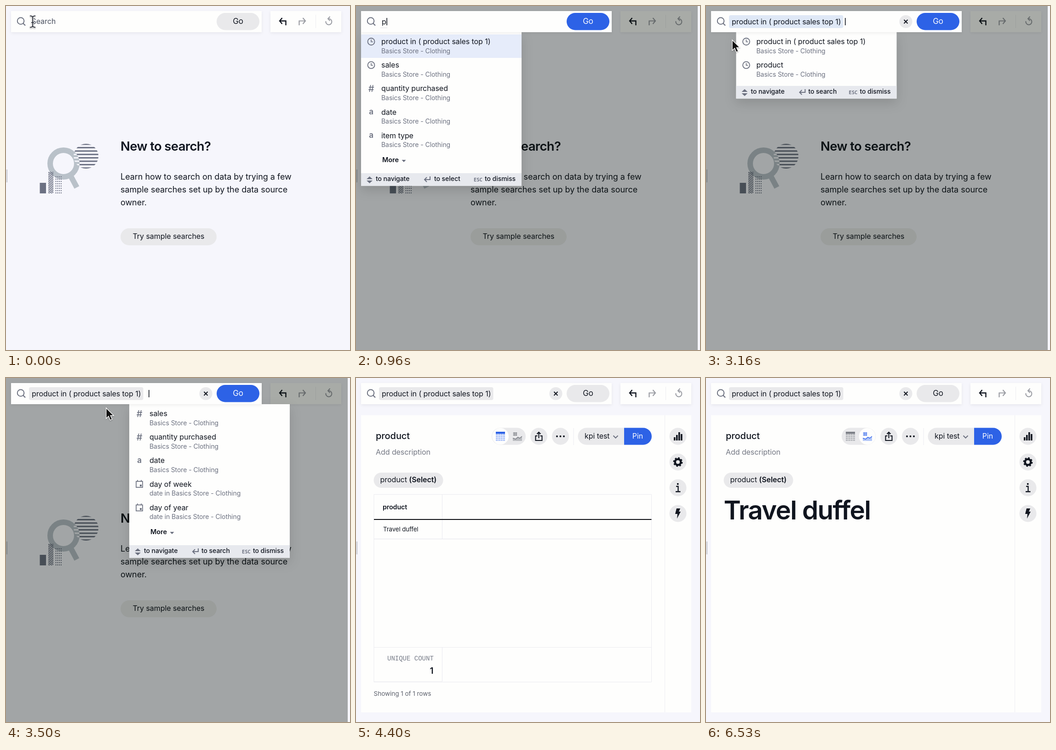
An HTML page for the animation above (8000 ms loop, 748x749 px).

```html
<!DOCTYPE html>
<html lang="en">
<head>
<meta charset="utf-8">
<title>Search demo</title>
<style>
html, body { margin: 0; width: 100%; height: 100%; overflow: hidden; background: #f6f6fc; }
svg { display: block; width: 748px; height: 749px; font-family: Inter, "Open Sans", sans-serif; letter-spacing: -.004em; }
text { white-space: pre; }
.bar { filter: drop-shadow(0 2px 3px #0001); }
.menu { filter: drop-shadow(0 9px 12px #0002); }
.cursor { filter: drop-shadow(0 1px 1px #0005); }
</style>
</head>
<body>
<svg id="stage" viewBox="0 0 748 749"></svg>
<script>
const LOOP = 8000;
const INK = '#10151f', GRAY = '#6c7180', PILL = '#e9e9eb', WHITE = '#fefefd', BLUE = '#2d62e6';
const stage = document.getElementById('stage');
const ctx = document.createElement('canvas').getContext('2d');

// Drawing helpers, all returning SVG markup
const text = (x, y, s, size = 16, fill = INK, more = '') =>
  `<text x="${x}" y="${y}" font-size="${size}" fill="${fill}" ${more}>${s}</text>`;
const rect = (x, y, w, h, fill, rx = 0, more = '') =>
  `<rect x="${x}" y="${y}" width="${w}" height="${h}" fill="${fill}" rx="${rx}" ${more}/>`;
const circle = (x, y, r, fill, more = '') => `<circle cx="${x}" cy="${y}" r="${r}" fill="${fill}" ${more}/>`;
const line = (d, color = INK, w = 2, more = '') =>
  `<path d="${d}" fill="none" stroke="${color}" stroke-width="${w}" ${more}/>`;
const shape = (d, fill, more = '') => `<path d="${d}" fill="${fill}" ${more}/>`;
const at = (x, y, s, cls = '') => `<g transform="translate(${x} ${y})" class="${cls}">${s}</g>`;
const times = (n, f) => Array.from({ length: n }, (_, i) => f(i)).join('');
const bold = 'font-weight="600"', medium = 'font-weight="500"', mid = 'text-anchor="middle"';

const textWidth = s => {
  ctx.font = '16px Inter, "Open Sans", sans-serif';
  return ctx.measureText(s).width;
};
const ease = (t, a, b) => {
  const p = Math.min(1, Math.max(0, (t - a) / (b - a)));
  return p * p * (3 - 2 * p);
};
const mix = (a, b, p) => +(a + (b - a) * p).toFixed(1);

// Search suggestions
const SOURCE = 'Basics Store - Clothing';
const TOP = 'product in ( product sales top 1)';
const topRow = ['clock', TOP], productRow = ['clock', 'product'];
const tail = [['#', 'quantity purchased'], ['a', 'date'], ['a', 'item type']];
const firstRows = [topRow, ['clock', 'sales'], ...tail];
const typedRows = [topRow, productRow, ...tail];
const nextRows = [['#', 'sales'], ['#', 'quantity purchased'], ['a', 'date'], ['day', 'day of week'], ['day', 'day of year']];

const icons = {
  clock: circle(0, 0, 7.5, 'none', `stroke="${GRAY}" stroke-width="1.8"`) + line('M0-4.5V.5H4', GRAY, 1.6),
  '#': text(0, 7, '#', 20, GRAY, mid + ' ' + medium),
  a: text(0, 5, 'a', 17, GRAY, mid + ' ' + bold),
  day: line('M-7-6H7V7H-7ZM-4-9v3M4-9v3', GRAY, 1.7) + rect(1, 1, 4, 4, GRAY)
};

function menu(x, rows, chosen) {
  const full = rows.length > 2, foot = full ? 364 : 174;
  const end = foot + 27.5, verb = chosen ? 'select' : 'search';
  let s = rect(0, 57, 349, end - 57, WHITE);
  if (chosen) s += rect(0, 62, 349, 51, '#e6ecfa');
  rows.forEach(([icon, name], i) => {
    const y = 62 + i * 51.2;
    s += at(22, y + 15.5, icons[icon]) + text(44, y + 21, name) +
      text(44, y + 40.5, (icon == 'day' ? 'date in ' : '') + SOURCE, 14, GRAY);
  });
  if (full) s += text(46, 340, 'More', 14.5, INK, bold) + shape('M88.5 335h9l-4.5 5z', GRAY);
  const y = foot + 18;
  s += rect(0, foot, 349, 27.5, '#e7e9ee') +
    shape(`M12 ${y - 5}h13l-6.5-6zM12 ${y - 2}h13l-6.5 6z`, GRAY) +
    text(32, y - 1, 'to navigate', 14, INK, medium) +
    line(`M150 ${y - 11}v7h-11M143 ${y - 9}l-5 5 5 5`, GRAY, 2) +
    text(chosen ? 159 : 157, y - 1, 'to ' + verb, 14, INK, medium) +
    text(245, y, 'ESC', 10.5, GRAY, 'font-weight="700" font-family="Noto Sans Mono, monospace"') +
    text(269, y - 1, 'to dismiss', 14, INK, medium);
  return at(x, 0, s, 'menu');
}

function menuAt(t) {
  if (t < 360 || t >= 4400) return '';
  if (t < 930) return menu(11, firstRows, false);
  if (t < 1430) return menu(11, firstRows, true);
  if (t < 1670) return menu(11, typedRows, true);
  if (t < 3130) return menu(11, [topRow, productRow], true);
  return t < 3430 ? menu(65.5, [topRow, productRow], false) : menu(268, nextRows, false);
}

// Search bar and history buttons
const historyBar = rect(575, 11, 154, 46, WHITE, 0, 'class="bar"') +
  line('M600.5 26l-5.5 6.5 5.5 6.5M595 32.5h13.5v9.5', INK, 2.4) +
  line('M645.5 26l5.5 6.5-5.5 6.5M651 32.5h-13.5v9.5', '#9a9ca3', 2.2) +
  line('M673.5 19v29', '#ececf0', 1) +
  line('M695.5 33a6.5 6.5 0 1 0 6.5-5.2M704.5 23l-4.5 4.7 4.5 4.7', '#9a9ca3', 2);

const keys = [[930, 'p'], [1160, 'r'], [1260, 'o'], [1360, 'd'], [1600, 'u'], [1730, 'c']];

function searchBar(t, pointer) {
  const active = t >= 130 && t < 4400;
  const onGo = active && pointer && pointer.x > 458 && pointer.y < 52;
  const pressed = onGo || (t >= 3960 && t < 4400);
  let s = rect(11, 11, 545, 46, WHITE, 0, 'class="bar"') +
    circle(32, 32.5, 7.3, 'none', `stroke="${GRAY}" stroke-width="2"`) + line('M37 37.5l5 5', GRAY, 2.2) +
    rect(458, 15, 93, 37.5, active ? (pressed ? '#2149a5' : BLUE) : PILL, 18.7) +
    text(504.5, 39, 'Go', 17, active ? '#fff' : INK, mid);
  if (t >= 1160) s += circle(434.5, 34, 14, PILL) + line('M430.5 30l8 8m0-8l-8 8');

  let caret = 54, since = 200, shown = active && t >= 200;
  if (t < 930) s += text(55.5, 39, 'Search', 16, '#4b5160');
  else if (t < 3130) {
    const typed = keys.filter(k => k[0] <= t);
    const word = typed.map(k => k[1]).join('');
    caret = 56.5 + textWidth(word);
    since = typed[typed.length - 1][0];
    s += text(56, 40, word) + line(`M53 47.5H${caret + 2}`, '#e2e2e6', 1);
  } else {
    const fresh = t < 3430;
    caret = fresh ? 302 : 310;
    since = fresh ? 3130 : 3430;
    s += rect(50, 20, 248.5, 28, fresh ? '#dfe8f6' : PILL, 4) + text(56, 40, TOP);
  }
  if (shown && (t - since) % 1060 < 530) s += rect(caret, 26, 1.6, 16, INK);
  return s;
}

// Start page
const SLATE = '#6c7183', STEEL = '#b9c1c9';
const stripes = (color, clip) => `<g clip-path="url(#${clip})">` +
  times(8, i => rect(146, 299.5 + i * 7.4, 56, 3, color)) + '</g>';
const welcome = `<defs>
  <clipPath id="disc">${circle(174, 327, 27)}</clipPath>
  <clipPath id="bar">${rect(92, 361, 11, 47)}</clipPath>
  <clipPath id="lens">${circle(125, 343, 35)}</clipPath></defs>` +
  stripes(SLATE, 'disc') +
  line('M139 367l15 28', STEEL, 12) +
  circle(125, 343, 29, '#f6f6fc', `stroke="${STEEL}" stroke-width="12"`) +
  `<g clip-path="url(#lens)">${stripes('#f6f6fc', 'disc')}</g>` +
  rect(73.5, 385, 13.5, 23, SLATE) +
  `<g clip-path="url(#bar)">${times(17, i => line(`M91 ${349 + i * 4}l13 10`, SLATE, 1.8))}</g>` +
  times(32, i => circle(108.5 + i % 4 * 3.8, 372 + (i >> 2) * 5, 1.15, SLATE)) +
  text(249, 314.5, 'New to search?', 27.5, INK, bold + ' letter-spacing="-.65"') +
  ['Learn how to search on data by trying a few', 'sample searches set up by the data source', 'owner.']
    .map((s, i) => text(249, 377.5 + i * 28, s, 18, INK, 'letter-spacing="-.05"')).join('') +
  rect(249, 484, 209, 37, PILL, 18.5) + text(353.5, 507, 'Try sample searches', 16, INK, mid);

// Answer page
const tableIcon = on => rect(304, 117, 20, 20, on ? '#b3c7f8' : '#b9bbbf') +
  rect(304, 117, 20, 4.5, on ? BLUE : '#7d8087') +
  line('M304 125.5h20m-20 4h20m-20 4h20M309 121.5v16m5-16v16m5-16v16', on ? '#f0f4fe' : '#e6e6e8', 1);
const kpiIcon = on => {
  const c = on ? '#3a6cec' : '#7d8087';
  return shape('M341 131l6 2 5-4 4 2 5-4v10h-20z', on ? '#b3c7f8' : '#b9bbbf') +
    line('M341 131l6 2 5-4 4 2 5-4', c, 1.6) +
    line('M344 118v8m4-8v8M341.5 120h9m-9 4h9', c, 1.4);
};
const round = (x, y, icon) => circle(x, y, 18.5, PILL) + at(x, y, icon);
const gear = circle(0, 0, 6.3, 'none', `stroke="${INK}" stroke-width="4.5"`) +
  circle(0, 0, 8.9, 'none', `stroke="${INK}" stroke-width="3" stroke-dasharray="3.5 3.49"`);
const panel = rect(11, 81, 718, 647, WHITE) + line('M671.5 81v647', '#eeeef3', 1) +
  text(43, 133, 'product', 20, INK, medium) + text(43, 167, 'Add description', 16, '#737783') +
  rect(295, 108.5, 74, 37, PILL, 18.5) +
  round(397.5, 127, line('M-3-1h-4v10h14V-1H3M0 4V-8M-4-5l4-4 4 4', INK, 2.1)) +
  round(444.5, 127, [-7.5, 0, 7.5].map(x => circle(x, 0, 2, INK)).join('')) +
  line('M473 109v37', '#ececf0', 1) +
  shape('M583 108.5h-82a18.5 18.5 0 0 0 0 37h82z', PILL) + text(497, 132, 'kpi test') +
  line('M559.5 125.5l5 5 5-5', GRAY, 2) +
  shape('M583 108.5h41.5a18.5 18.5 0 0 1 0 37h-41.5z', BLUE) + text(612.5, 132, 'Pin', 16, '#fff', mid) +
  rect(38.5, 206, 151, 33, PILL, 16.5) +
  text(52.5, 227, `product <tspan ${bold}>(Select)</tspan>`) +
  round(700, 127, rect(-9, 2, 3.6, 7, INK) + rect(-4, -3, 3.6, 12, INK) + rect(1, -9, 3.6, 18, INK) + rect(6, -5, 3.6, 14, INK)) +
  round(700, 183, gear) +
  round(700, 239, line('M-4-3H.5V8M-5 8.5H5.5', INK, 2.3) + rect(-2, -10, 3.5, 3.5, INK)) +
  round(700, 295, shape('M-3-11h8l-3 7h4l-8 15 1-10h-5z', INK));

const table = line('M39 253.5h603.5v408.5h-603.5z', '#ebebf0', 1) +
  line('M187.5 254v96M39 586.5h603.5M187.5 587v74M39 661h148', '#ebebf0', 1) +
  line('M39 350.5h603.5', '#e4e4ec', 1) + line('M39 308h603.5', '#0b0d12', 2) +
  text(58, 286, 'product', 14.2, INK, bold) + text(59, 334, 'Travel duffel', 13.2) +
  text(68, 615, 'UNIQUE COUNT', 14, '#777c88', 'letter-spacing="0" font-family="Liberation Mono, monospace"') +
  text(168.5, 644, '1', 19, INK, bold + ' text-anchor="end"') +
  text(38.5, 692, 'Showing 1 of 1 rows', 13.6, '#5c606c');

const headline = text(38.5, 308, 'Travel duffel', 56.5, INK, bold + ' letter-spacing="-1.65"');

function answer(t) {
  const kpi = t >= 5630;
  return panel + circle(kpi ? 350.5 : 314, 127, 18, WHITE) +
    tableIcon(!kpi) + kpiIcon(t >= 5100) +
    (kpi ? (t >= 5700 ? headline : '') : table);
}

// Mouse pointer: kind and hot spot
const cursors = {
  beam: [['#fff', 4], ['#3c3f48', 2.2]].map(([c, w]) =>
    line('M-6-12.5q6 0 6 4v17q0 4-6 4M6-12.5q-6 0-6 4M6 12.5q-6 0-6-4M-3 2h6', c, w)).join(''),
  arrow: shape('M0 0v23l5.3-5 3.6 8.5 4.2-1.8-3.6-8.2h7z', '#111', 'stroke="#fff" stroke-width="1.4"'),
  hand: at(-9, -2, shape('M7 4c0-3 4-3 4.3-.3l1 6.3c.3-1.6 3.4-1.6 3.8.4.5-1.4 3.4-1 3.7.9.7-1.1 3-.6 3.3 1.2.4 4-.2 8-2.3 10.5v3.5h-9.5v-2c-2.5-2-5-5.5-7-8.3-1.2-2.2 1.2-3.6 3-2l1.8 1.7z',
    '#fff', 'stroke="#111" stroke-width="1.7"') + line('M13.5 17v5m3-5v5m3-5v5', '#111', 1.2))
};

function pointerAt(t) {
  const spot = (x, y, kind) => ({ x, y, kind });
  if (t < 930) return spot(58, 34, 'beam');
  if (t >= 2330 && t < 3130) {
    const p = ease(t, 2330, 2960), y = mix(34, 74, p);
    return spot(mix(58, 57, p), y, y < 57 ? 'beam' : 'hand');
  }
  if (t >= 3130 && t < 4260) {
    const p = ease(t, 3200, 3960), x = mix(57, 521, p), y = mix(74, 49, p);
    const overMenu = x > (t < 3430 ? 65 : 268);
    return spot(x, y, y < 57 ? (x > 458 ? 'hand' : 'beam') : overMenu ? 'hand' : 'arrow');
  }
  if (t >= 4630 && t < 6060) {
    const p = ease(t, 4630, 5200), x = mix(502, 347, p);
    const y = mix(55, 137, p) + +(Math.sin(Math.PI * p) * 12).toFixed(1);
    const onButton = y > 109 && y < 146 && (x < 369 || (x > 379 && x < 463));
    return spot(x, y, onButton ? 'hand' : 'arrow');
  }
  if (t >= 6060 && t < 6100) return spot(362, 115, 'hand');
  if (t >= 6100 && t < 6530) return spot(376, 94, 'arrow');
  return null;
}

function scene(t) {
  const pointer = pointerAt(t);
  const dim = t < 130 || t >= 4400 ? 0 : t < 200 ? .17 : .34;
  return rect(0, 0, 748, 749, '#f6f6fc') + rect(1, 356, 2, 28, '#c3c6ce') +
    (t < 4400 ? welcome : answer(t)) + historyBar +
    (dim ? rect(0, 0, 743, 749, `rgba(0,10,0,${dim})`) : '') +
    menuAt(t) + searchBar(t, pointer) +
    (pointer ? at(pointer.x, pointer.y, cursors[pointer.kind], 'cursor') : '');
}

let last = '';
function tick() {
  const markup = scene(performance.now() % LOOP);
  if (markup !== last) stage.innerHTML = last = markup;
  requestAnimationFrame(tick);
}
tick();
</script>
</body>
</html>
```
